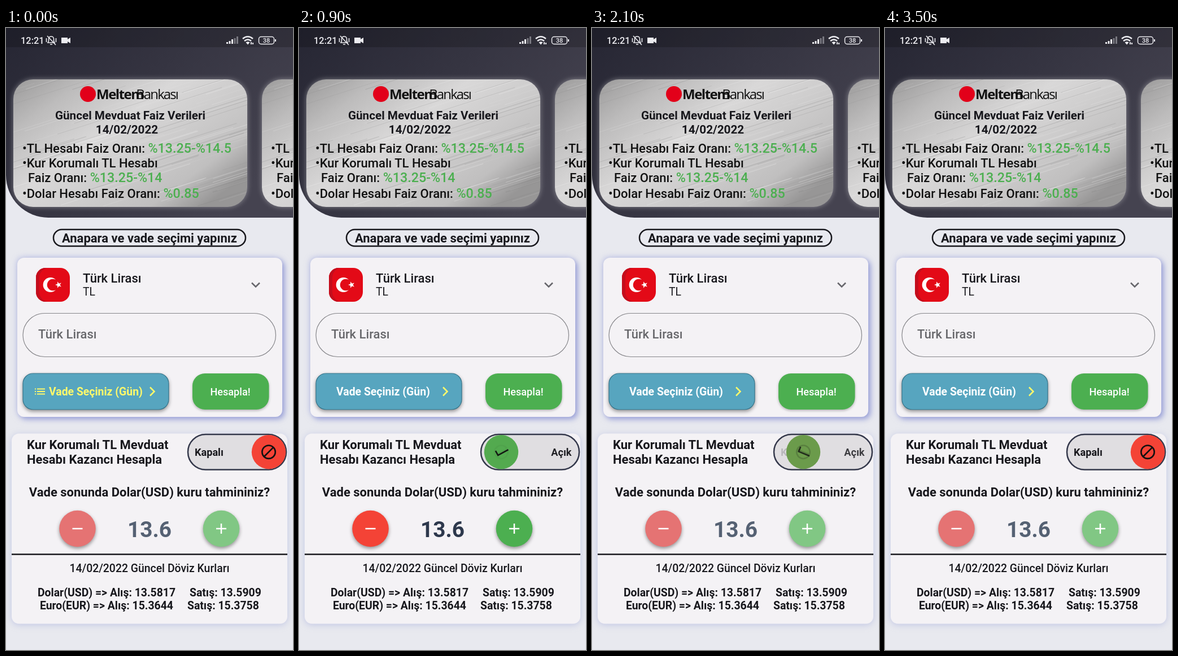
Write an HTML page that moves like this. It is 508 by 1102 pixels and loops after 3600 ms.

```html
<!DOCTYPE html>
<html lang="tr">
<head>
<meta charset="utf-8">
<style>
  html, body { margin: 0; width: 100%; height: 100%; overflow: hidden; background: #e8e9ef; }
  svg { display: block; width: 508px; height: 1102px; font-family: Roboto, sans-serif; fill: #17171c; }
  text { white-space: pre; }
  .b { font-weight: 700; }
  .m { font-weight: 500; }
  .s14 { font-size: 18.1px; }
  .s15 { font-size: 19.4px; }
  .s16 { font-size: 20.7px; }
  .s17 { font-size: 22px; }
  .rate { font-size: 23.3px; fill: #4caf50; }
  .mid { text-anchor: middle; }
  .line { fill: none; stroke-width: 2.5; }
  .card { filter: drop-shadow(0 0 5px #ffffff60); }
  .lift { filter: drop-shadow(0 3px 3px #0006); }
  .panel { fill: #f4f2f5; }
</style>
</head>
<body>
<svg viewBox="0 0 508 1102">
  <defs>
    <linearGradient id="night" x2="1" y2=".6">
      <stop stop-color="#262633"/><stop offset="1" stop-color="#454350"/>
    </linearGradient>
    <linearGradient id="steel" x2="1" y2=".75">
      <stop stop-color="#9b9a9a"/><stop offset=".2" stop-color="#bdbcbc"/>
      <stop offset=".45" stop-color="#d9d8d8"/><stop offset=".62" stop-color="#cfcece"/>
      <stop offset=".85" stop-color="#c0bfbf"/><stop offset="1" stop-color="#979696"/>
    </linearGradient>
    <clipPath id="cardClip"><rect x="13" y="91" width="414" height="226" rx="35"/></clipPath>
    <g id="plate">
      <rect class="card" x="13" y="91" width="414" height="226" rx="35" fill="url(#steel)"/>
      <g id="streaks" clip-path="url(#cardClip)" stroke-width="1.2"/>
    </g>
  </defs>

  <path d="M0 0H508V336H75A75 75 0 0 1 0 261Z" fill="url(#night)"/>
  <rect width="508" height="34" fill="#0003"/>

  <g fill="#ececf0" stroke="#ececf0" stroke-width="0">
    <text class="m" x="26" y="28" font-size="16.4">12:21</text>
    <path class="line" stroke-width="1.6" style="stroke-width:1.6" d="M74 26H86L84.500 23V19Q84 15 80 15T75.500 19V23ZM78 29H82M73 14L88 30M71.500 18V25M88.500 18V25"/>
    <path d="M98 17H109V20L114 17V27L109 24V27H98Z"/>
    <path d="M390 25h3v3h-3zM394.500 23h3v5h-3zM399 20h3v8h-3z"/>
    <path opacity=".4" d="M403.500 18h3v10h-3zM408 15h3v13h-3z"/>
    <path class="line" d="M419 19Q428 11.500 437 19M422 23Q428 18 434 23"/>
    <path d="M424.500 25.500Q428 23 431.500 25.500L428 29.500ZM433 25h2v4h-2zM436 26h2v3h-2z"/>
    <rect x="447.500" y="15.500" width="27" height="13" rx="4" style="fill:none;stroke-width:1.5"/>
    <path d="M476 20h2v4h-2z"/>
    <text class="m mid" x="461" y="26" font-size="11">38</text>
  </g>

  <use href="#plate"/>
  <use href="#plate" x="440"/>
  <circle cx="145" cy="117" r="14" fill="#e2001a"/>
  <g font-family="Open Sans, sans-serif" font-size="24" letter-spacing="-1.5" fill="#111">
    <text class="b" x="160" y="126">Meltem</text>
    <text x="304" y="126" text-anchor="end" letter-spacing="-1.900">Bankası</text>
  </g>
  <g class="m s16 mid">
    <text x="220" y="162" class="b">Güncel Mevduat Faiz Verileri</text>
    <text x="214" y="186.500" class="b">14/02/2022</text>
  </g>
  <g class="m s17" fill="#111">
    <g id="rates">
      <text x="29" y="220.500">•TL Hesabı Faiz Oranı: <tspan class="rate">%13.25-%14.5</tspan></text>
      <text x="29" y="246.500">•Kur Korumalı TL Hesabı</text>
      <text x="39" y="273">Faiz Oranı: <tspan class="rate">%13.25-%14</tspan></text>
      <text x="29" y="300.500">•Dolar Hesabı Faiz Oranı: <tspan class="rate">%0.85</tspan></text>
    </g>
    <use href="#rates" x="440"/>
  </g>

  <rect class="line" x="84" y="357" width="340" height="29.500" rx="14.700" stroke="#17171c"/>
  <text class="b s17 mid" x="254" y="380">Anapara ve vade seçimi yapınız</text>

  <rect class="panel" x="20" y="407" width="469" height="282" rx="12"
    style="filter:drop-shadow(4px 4px 5px #7f88cfb0) drop-shadow(-2px -2px 4px #a9b0e080)"/>
  <rect x="53" y="425" width="60" height="60" rx="17" fill="#e30a17"/>
  <path d="M70 425A17 17 0 0 0 53 442V468A17 17 0 0 0 70 485H76A17 17 0 0 1 59 468V442A17 17 0 0 1 76 425Z" fill="#c40d1c"/>
  <path d="M88 446A13 13 0 1 0 88 464A10.300 10.300 0 1 1 88 446Z" fill="#fff"/>
  <path id="star" fill="#fff"/>
  <text class="m s17" x="136" y="451">Türk Lirası</text>
  <text class="s15" x="136" y="474">TL</text>
  <path class="line" d="M435 451.500L442 458.500L449 451.500" stroke="#66666b"/>
  <rect x="30" y="505.500" width="447.500" height="77" rx="38.500" fill="none" stroke="#86868a" stroke-width="1.200"/>
  <text class="m s17" x="57" y="549.500" fill="#67676b">Türk Lirası</text>

  <rect class="lift" x="30" y="612" width="258" height="64" rx="18" fill="#57a5bf" stroke="#35748a" stroke-width="1.200"/>
  <g id="listIcon" fill="#fff96b">
    <path d="M51 638.500h2v2h-2zm4 0h14v2h-14zM51 643h2v2h-2zm4 0h14v2h-14zM51 647.500h2v2h-2zm4 0h14v2h-14z"/>
  </g>
  <text id="term" class="b s15" y="650.500">Vade Seçiniz (Gün)</text>
  <path class="line" d="M255 636.500L262.500 644L255 651.500" stroke="#fff96b"/>
  <rect x="330" y="612" width="135.500" height="64" rx="22" fill="#4caf50" style="filter:drop-shadow(0 2px 2px #0004)"/>
  <text class="m s14 mid" x="397" y="650.500" fill="#fff">Hesapla!</text>

  <rect class="panel" x="10" y="718.500" width="488" height="337" rx="13"
    style="filter:drop-shadow(0 2px 6px #a4addc90)"/>
  <g class="b s17">
    <text x="37" y="746">Kur Korumalı TL Mevduat</text>
    <text x="37" y="772">Hesabı Kazancı Hesapla</text>
    <text class="mid" x="254" y="830">Vade sonunda Dolar(USD) kuru tahmininiz?</text>
  </g>

  <rect class="line" x="322" y="720" width="174" height="62.500" rx="31.250" stroke="#34384b" style="fill:#e0dee1"/>
  <g class="b s14">
    <text id="offText" x="334" y="757.500">Kapalı</text>
    <text id="onText" x="482.500" y="757.500" text-anchor="end">Açık</text>
  </g>
  <g id="knob">
    <circle r="30.200"/>
    <g fill="#111" transform="scale(1.3) translate(-12 -12)">
      <path id="ban" d="M5.600 18.400L18.400 5.600M3 12a9 9 0 1 0 18 0a9 9 0 1 0-18 0" fill="none" stroke="#111" stroke-width="2"/>
      <path id="check" d="M9 16.170L4.830 12L3.410 13.410L9 19L21 7L19.590 5.590Z"/>
    </g>
  </g>

  <circle id="minus" class="lift" cx="126.500" cy="887" r="32.300"/>
  <circle id="plus" class="lift" cx="381" cy="887" r="32.300"/>
  <path class="line" d="M117.500 887h18M372 887h18M381 878v18" stroke="#fff"/>
  <text id="guess" class="b mid" x="254" y="901.500" font-size="38.800">13.6</text>

  <path class="line" d="M10 932.500H498" stroke="#17171c"/>
  <text class="m s15 mid" x="254" y="963.500">14/02/2022 Güncel Döviz Kurları</text>
  <g class="b s15">
    <text x="56" y="1006.500">Dolar(USD) =&gt; Alış: 13.5817</text>
    <text x="325" y="1006.500">Satış: 13.5909</text>
    <text x="60" y="1029.500">Euro(EUR) =&gt; Alış: 15.3644</text>
    <text x="321" y="1029.500">Satış: 15.3758</text>
  </g>
</svg>
<script>
const $ = id => document.getElementById(id);
const set = (id, attrs) => {
  for (const name in attrs) $(id).setAttribute(name, attrs[name]);
};

const LOOP = 3600, TURN_ON = 450, TURN_OFF = 1942, SLIDE = 530, TERM_CHANGE = 200;
const RED = [244, 67, 54], GREEN = [76, 175, 80];

// Brushed metal
let seed = 7;
const random = () => (seed = seed * 16807 % 2147483647) / 2147483647;
let streaks = '';
for (let i = 0; i < 90; i++) {
  const x = random() * 440 - 40, y = 91 + random() * 226, length = 60 + random() * 170;
  streaks += `<path d="M${x} ${y}l${length} ${-length * .32}" stroke="${random() < .65 ? '#fff' : '#777'}" opacity="${.06 + random() * .2}"/>`;
}
$('streaks').innerHTML = streaks;

const starPoints = Array.from({ length: 10 }, (_, i) => {
  const r = i % 2 ? 2.4 : 6, a = Math.PI * (1 + i / 5);
  return [93 + r * Math.cos(a), 455 + r * Math.sin(a)];
});
set('star', { d: 'M' + starPoints.join('L') + 'Z' });

// cubic-bezier(.42, 0, .58, 1)
function easeInOut(x) {
  if (x <= 0) return 0;
  if (x >= 1) return 1;
  let low = 0, high = 1, p;
  for (let i = 0; i < 20; i++) {
    p = (low + high) / 2;
    const q = 1 - p;
    if (3 * q * q * p * .42 + 3 * q * p * p * .58 + p ** 3 < x) low = p; else high = p;
  }
  return p * p * (3 - 2 * p);
}

function draw(now) {
  const t = now % LOOP;
  const on = easeInOut((t - TURN_ON) / SLIDE) - easeInOut((t - TURN_OFF) / SLIDE);
  const color = RED.map((c, i) => Math.round(c + (GREEN[i] - c) * on));
  set('knob', {
    transform: `translate(${465 - 112 * on} 751.2) rotate(${360 * (1 - on)})`,
    fill: `rgb(${color})`
  });
  set('ban', { opacity: 1 - on });
  set('check', { opacity: on });
  set('offText', { opacity: 1 - on });
  set('onText', { opacity: on });

  const enabled = t >= TURN_ON && t < TURN_OFF;
  set('minus', { fill: enabled ? '#f44336' : '#e57373' });
  set('plus', { fill: enabled ? '#4caf50' : '#81c784' });
  set('guess', { fill: enabled ? '#2d384c' : '#556173' });

  const listed = t < TERM_CHANGE;
  set('listIcon', { opacity: +listed });
  set('term', { x: listed ? 76 : 66, fill: listed ? '#fff96b' : '#fff' });
}

const start = performance.now();
(function tick() {
  draw(performance.now() - start);
  requestAnimationFrame(tick);
})();
</script>
</body>
</html>
```
